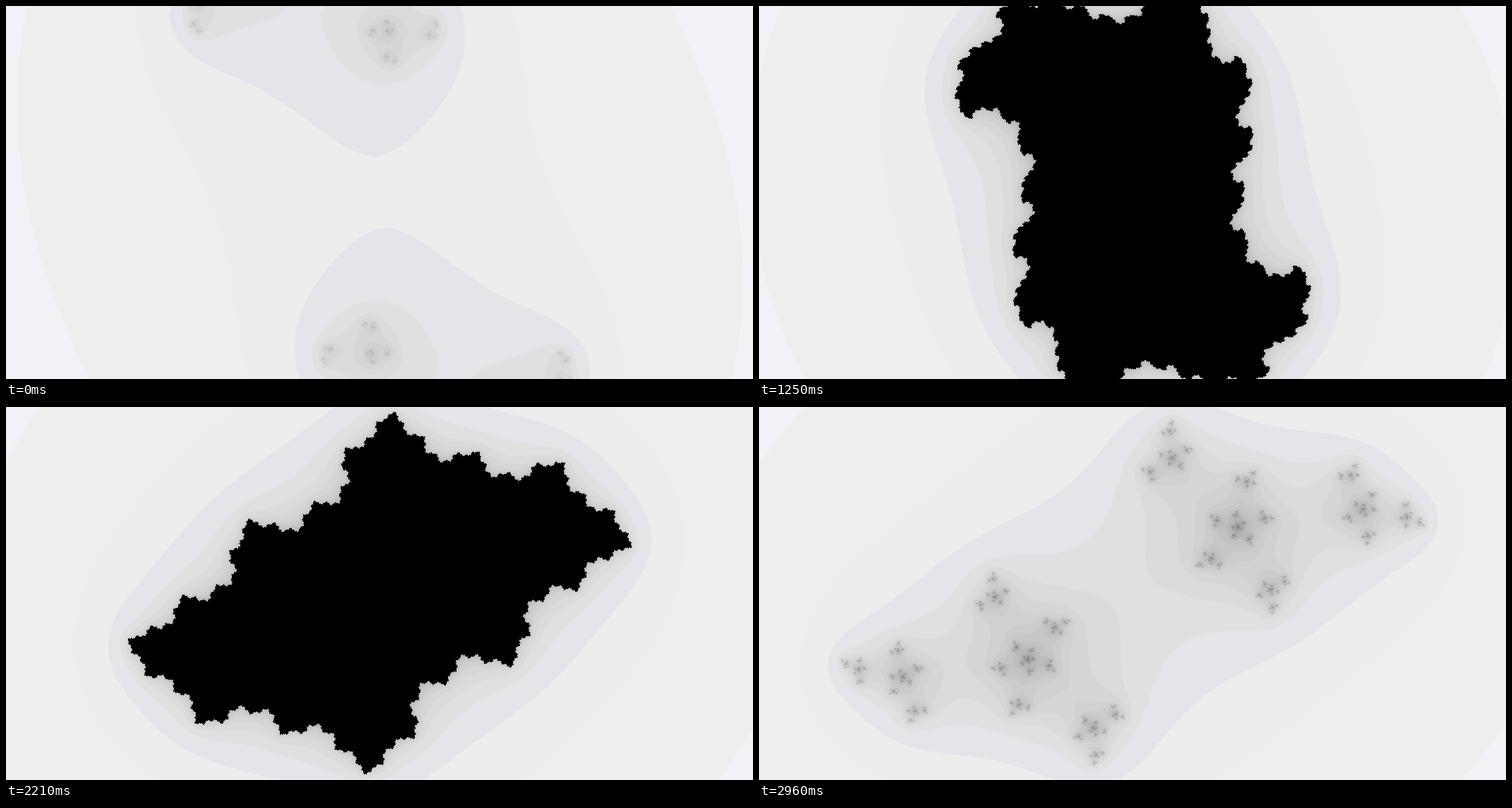
An HTML page with a canvas that plays this animation: 1058 by 529 pixels, repeating every 3000 ms.

```html
<!DOCTYPE html>
<html lang="en">
<head>
<meta charset="utf-8">
<title>Julia set</title>
<style>
html, body { margin: 0; width: 100%; height: 100%; overflow: hidden; background: #eee; }
canvas { display: block; width: 100%; height: 100%; }
</style>
</head>
<body>
<canvas id="stage" width="1058" height="529"></canvas>
<script>
const W = 1058, H = 529;
const LOOP = 3000, STEPS = 72;
const SCALE = H / 2, CX = W / 2, CY = H / 2 - 1;
const MAX_ITER = 50, ESCAPE = 20;
const REACH = 0.7885, TURN = 0.04;

const ctx = document.getElementById('stage').getContext('2d');
const image = ctx.createImageData(W, H);
const pixels = new Uint32Array(image.data.buffer);

const rgb = (r, g, b) => (255 << 24 | b << 16 | g << 8 | r) >>> 0;

// One shade per escape count, falling evenly to black.
const shades = Uint32Array.from({ length: MAX_ITER + 1 }, (_, n) => {
  const v = Math.round(255 * (1 - n / MAX_ITER));
  return rgb(v, v, v);
});
shades[2] = rgb(243, 241, 246);
shades[3] = rgb(238, 238, 238);
shades[4] = rgb(237, 237, 237);
shades[5] = rgb(230, 228, 232);

function escapeCount(x, y, cr, ci) {
  let n = 1, xx = x * x, yy = y * y;
  do {
    y = 2 * x * y + ci;
    x = xx - yy + cr;
    xx = x * x;
    yy = y * y;
    n++;
  } while (n < MAX_ITER && xx + yy < ESCAPE);
  return n;
}

// The constant swings along a diagonal of the complex plane.
// The set is point-symmetric, so only the lower half is computed.
function draw(step) {
  const k = REACH * Math.cos(step * TURN);
  for (let py = Math.ceil(CY); py < H; py++) {
    const y = (py - CY) / SCALE;
    const mirror = 2 * CY - py;
    for (let px = 0; px <= W; px++) {
      const shade = shades[escapeCount((px - CX) / SCALE, y, k, -k)];
      if (px < W) pixels[py * W + px] = shade;
      if (px > 0 && mirror >= 0) pixels[mirror * W + W - px] = shade;
    }
  }
  ctx.putImageData(image, 0, 0);
}

const start = performance.now();
let shown = -1;

function tick() {
  const t = Math.max(0, performance.now() - start) % LOOP;
  const step = Math.floor(t * STEPS / LOOP);
  if (step !== shown) draw(shown = step);
  requestAnimationFrame(tick);
}
tick();
</script>
</body>
</html>
```
